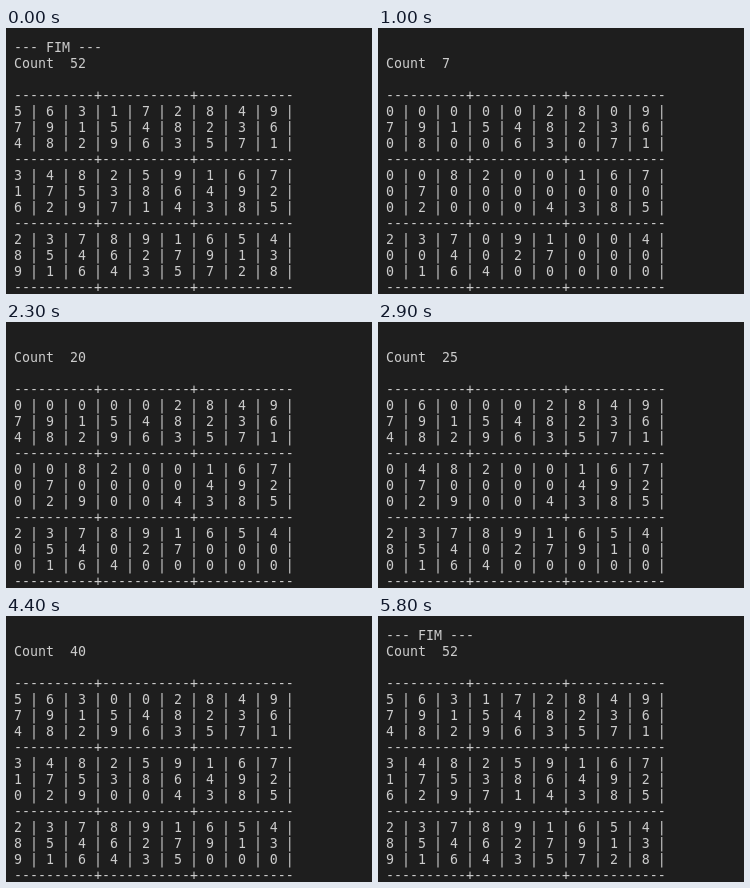
Recreate the animation shown at these times as an HTML page. Size 366x266 px, loop 6.9 s.

```html
<!DOCTYPE html>
<html lang="pt">
<head>
<meta charset="utf-8">
<title>Sudoku solver</title>
<style>
  html, body { margin: 0; width: 100%; height: 100%; overflow: hidden; background: #1e1e1e; }
  #screen {
    position: absolute; left: 8px; top: 12px;
    color: #ccc; font: 13.29px/15px "DejaVu Sans Mono", monospace;
    white-space: pre;
  }
  #screen div { height: 15px; margin-bottom: 1px; }
</style>
</head>
<body>
<div id="screen"></div>
<script>
const LOOP = 6900, START = 300, END = 5800, TICK = 100;
const SOLUTION = [
  "563172849", "791548236", "482963571",
  "348259167", "175386492", "629714385",
  "237891654", "854627913", "916435728"
];
// Cells (row, column) in the order the solver fills them
const ORDER = (
  "13 15 14 16 17 24 05 23 48 52 67 07 26 20 22 47 46 66 63 71 01 31 76 70 " +
  "77 78 73 80 85 35 45 84 34 30 00 02 40 42 43 44 50 86 87 88 03 04 53 54"
).split(" ");
const GUESS_FROM = 44;                    // the last four cells allow 1/7 or 7/1
const HOLDS = [600, 900, 1300, 2100, 2500, 2800, 4100, 4500, 4900, 5100];
const DOUBLES = [500, 1200, 2300, 2400, 4400, 4800];
const BORDER = "-".repeat(10) + "+" + "-".repeat(11) + "+" + "-".repeat(12);

const screen = document.getElementById("screen");
const lines = Array.from({ length: 16 }, () => screen.appendChild(document.createElement("div")));

function countAt(t) {
  const passed = list => list.filter(time => time <= t).length;
  return 1 + Math.floor((t - START) / TICK) - passed(HOLDS) + passed(DOUBLES);
}

function gridAt(count, done) {
  const grid = SOLUTION.map(row => [...row]);
  if (done) return grid;
  const second = count > ORDER.length;    // trying the other guess
  const filled = second ? count - ORDER.length + GUESS_FROM : count;
  ORDER.forEach(([r, c], i) => {
    if (i >= filled) grid[r][c] = "0";
    else if (second && i >= GUESS_FROM) grid[r][c] = 8 - grid[r][c];
  });
  return grid;
}

function render(t) {
  const done = t < START || t >= END;
  const count = done ? 52 : countAt(t);
  const text = [done ? "--- FIM ---" : "", "Count  " + count, ""];
  gridAt(count, done).forEach((row, r) => {
    if (r % 3 === 0) text.push(BORDER);
    text.push(row.join(" | ") + " |");
  });
  text.push(BORDER);
  text.forEach((line, i) => {
    if (lines[i].textContent !== line) lines[i].textContent = line;
  });
}

const began = performance.now();
function frame() {
  render((performance.now() - began) % LOOP);
  requestAnimationFrame(frame);
}
frame();
</script>
</body>
</html>
```
